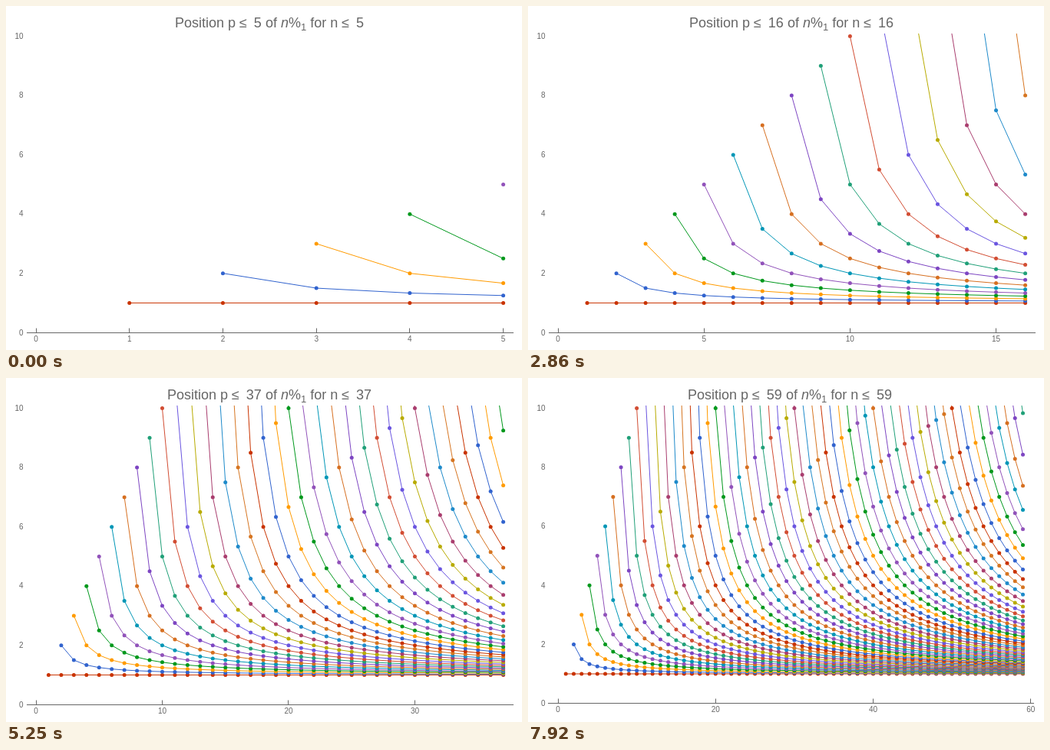
Recreate the animation shown at these times as an HTML page. Size 672 px wide and 450 px high, loop 8 s.

```html
<!DOCTYPE html>
<html lang="en">
<head>
<meta charset="utf-8">
<title>Position chart</title>
<style>
html, body { margin: 0; width: 100%; height: 100%; overflow: hidden; background: #fff; }
svg { display: block; width: 672px; height: 450px; }
text { font: 10px "Liberation Sans", Arial, sans-serif; fill: #666; }
.title { font-size: 18px; }
</style>
</head>
<body>
<svg id="chart" viewBox="0 0 672 450"></svg>
<script>
const LOOP = 8000;
const COLORS = ['#c93300', '#3163ce', '#ff9b00', '#00981c', '#9152ba',
  '#0096b6', '#d66f20', '#7d45c2', '#20a078', '#d24d33',
  '#6a55e0', '#b8ab00', '#a93d6e', '#1e8aca', '#d67521'];
// [start in ms, n]
const STEPS = [[0, 5], [250, 8], [500, 9], [640, 10], [780, 12], [900, 13],
  [1150, 14], [1270, 15], [2860, 16], [2980, 17], [3230, 19], [3370, 21],
  [3620, 23], [3870, 25], [3990, 26], [4110, 27], [4360, 29], [4630, 31],
  [4880, 34], [5250, 37], [5500, 39], [5620, 40], [5990, 43], [6360, 46],
  [6860, 50], [7390, 54], [7920, 59]];
const chart = document.getElementById('chart');

const tickStep = n => [1, 2, 5, 10, 20].find(s => n / s <= 5.5);

function title(n, x) {
  return `<text class="title" x="${x}" y="28" text-anchor="middle">Position p ≤<tspan dx="4"> ${n}</tspan> of ` +
    `<tspan font-style="italic">n</tspan>%<tspan font-size="13" dy="4">1</tspan>` +
    `<tspan dy="-4"> for n ≤</tspan><tspan dx="4"> ${n}</tspan></text>`;
}

function draw(n) {
  const step = tickStep(n);
  const last = Math.floor(n * 1.02 / step) * step;
  const tight = last > n; // a label past the data shrinks the plot
  const width = tight ? 605.5 : 608.6;
  const base = tight ? 425.6 : 427.2;
  const unit = tight ? 38.6 : 38.76;
  const X = v => 39 + v * width / n;
  const Y = v => base - v * unit;
  const axis = Math.floor(base) + .5;

  let lines = '', dots = '', frame = '', labels = '';
  for (let k = 1; k <= n; k++) {
    const color = COLORS[(k - 1) % COLORS.length];
    const points = [];
    for (let i = k; i <= n; i++) {
      const v = i / (i - k + 1);
      const x = X(i).toFixed(2), y = Y(v).toFixed(2);
      points.push(x + ',' + y);
      if (v < 10.09) dots += `<circle cx="${x}" cy="${y}" r="2.5" fill="${color}"/>`;
    }
    lines += `<polyline points="${points.join(' ')}" stroke="${color}"/>`;
  }
  for (let v = 0; v <= last; v += step) {
    const x = Math.floor(X(v)) + .5;
    frame += `M${x} ${axis}v-6`;
    labels += `<text x="${X(v)}" y="${axis + 11.5}" text-anchor="middle">${v}</text>`;
  }
  for (let v = 0; v <= 10; v += 2) {
    labels += `<text x="22.5" y="${Y(v) + 3.3}" text-anchor="end">${v}</text>`;
  }
  frame += tight ? `M26 ${axis}H659` : `M27 ${axis}H661`;

  chart.innerHTML =
    `<clipPath id="plot"><rect x="0" y="36" width="672" height="400"/></clipPath>` +
    `<path d="${frame}" stroke="#666" fill="none"/>` + labels + title(n, tight ? 341 : 343) +
    `<g clip-path="url(#plot)"><g fill="none">${lines}</g>${dots}</g>`;
}

let shown = 0;
function tick() {
  const t = performance.now() % LOOP;
  const n = STEPS.filter(s => s[0] <= t).pop()[1];
  if (n !== shown) draw(shown = n);
  requestAnimationFrame(tick);
}
tick();
</script>
</body>
</html>
```
